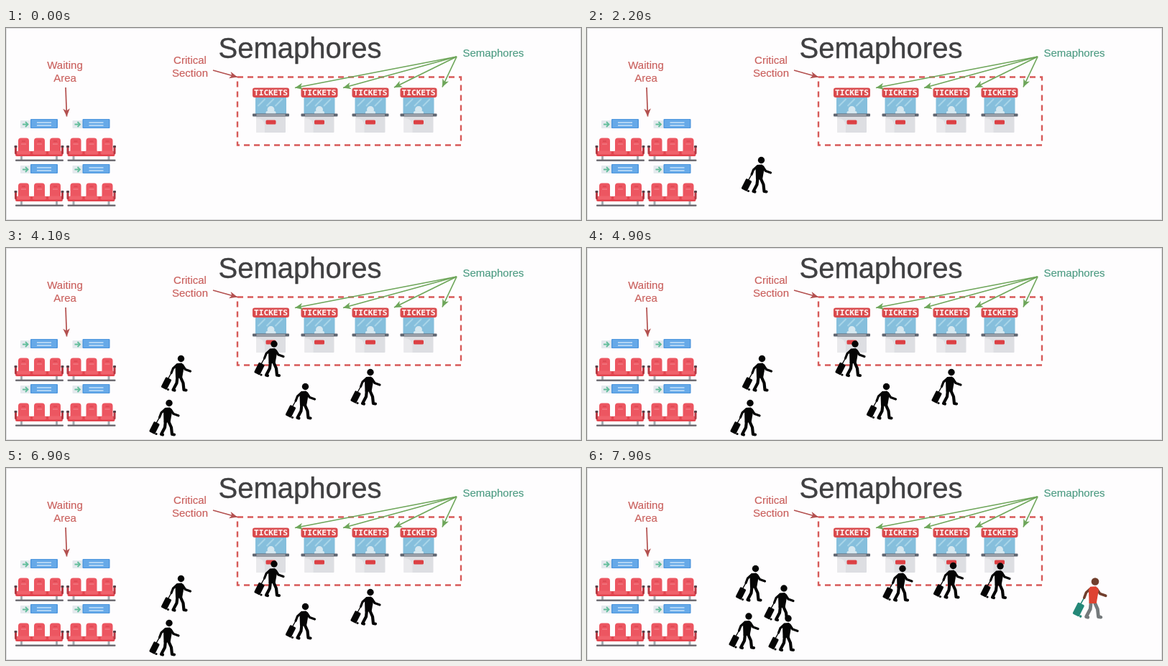
These frames come from a looping animation (800x268 px, 8000 ms). An HTML page with a canvas:

```html
<!DOCTYPE html>
<html lang="en">
<head>
<meta charset="utf-8">
<title>Semaphores</title>
<style>
html, body { margin: 0; width: 100%; height: 100%; overflow: hidden; background: #fefdfe; }
canvas { display: block; width: 800px; height: 268px; }
</style>
</head>
<body>
<canvas id="stage" width="800" height="268"></canvas>
<script>
const ctx = document.getElementById('stage').getContext('2d');
const LOOP = 8000;
const SANS = '"Liberation Sans", Arial, sans-serif';
const MONO = '"DejaVu Sans Mono", monospace';
const LABEL = '#c95f5c', RED = '#b3504f', GREEN = '#6ea65a';

// Each scene holds until the next one starts; people are placed by their heads.
const scenes = [
  { at: 0, people: [] },
  { at: 900, people: [[242.5, 184.5]] },
  { at: 3400, people: [[243.5, 154.5], [227, 216.5], [373, 134], [416.5, 193.5], [507, 173.5]] },
  { at: 7000, people: [[234.5, 140.5], [274, 168], [225, 207], [280, 210],
                       [439, 140.5], [509.5, 136.5], [575, 137]], served: [707, 158.5] }
];

function box(x, y, w, h, color, r = 0) {
  ctx.fillStyle = color;
  ctx.beginPath();
  ctx.roundRect(x, y, w, h, r);
  ctx.fill();
}

function disc(x, y, r, color) {
  ctx.fillStyle = color;
  ctx.beginPath();
  ctx.arc(x, y, r, 0, 2 * Math.PI);
  ctx.fill();
}

function poly(points, color) {
  ctx.fillStyle = color;
  ctx.beginPath();
  points.forEach(([x, y]) => ctx.lineTo(x, y));
  ctx.closePath();
  ctx.fill();
}

function line(points, color, width) {
  ctx.strokeStyle = color;
  ctx.lineWidth = width;
  ctx.beginPath();
  points.forEach(([x, y]) => ctx.lineTo(x, y));
  ctx.stroke();
}

function text(str, x, y, size, color, font = SANS, weight = '') {
  ctx.font = `${weight} ${size}px ${font}`;
  ctx.fillStyle = ctx.strokeStyle = color;
  ctx.textAlign = 'center';
  ctx.lineWidth = size / 100;
  ctx.fillText(str, x, y);
  ctx.strokeText(str, x, y);
}

function at(x, y, scale, draw) {
  ctx.save();
  ctx.translate(x, y);
  ctx.scale(scale, scale);
  draw();
  ctx.restore();
}

function arrow(x1, y1, x2, y2, color) {
  line([[x1, y1], [x2, y2]], color, 1.7);
  ctx.save();
  ctx.translate(x2, y2);
  ctx.rotate(Math.atan2(y2 - y1, x2 - x1));
  poly([[0, 0], [-11, -4.8], [-8, 0], [-11, 4.8]], color);
  ctx.restore();
}

function booth(x) {
  at(x, 83, 1, () => {
    box(-21.5, 12, 43, 26, '#86bfdc');
    for (const dx of [-13, -1, 11]) {
      line([[dx - 5, 26], [dx + 5, 16]], '#a9d5e8', 2);
    }
    disc(0, 31, 5, '#d6e8f0');
    box(-7, 33, 14, 5, '#d6e8f0', 2);
    box(-20.5, 40, 41, 23, '#dddee2', 1);
    box(-20.5, 43, 12, 20, '#e9e9ec', [0, 10, 0, 0]);
    box(-7, 45.5, 14, 6, '#dc4044', 1.5);
    box(-25.5, 36.5, 51, 4, '#5f6570', 1);
    box(-20, 37.5, 40, 2, '#aeb3bb');
    box(-25.5, 0.5, 51, 13.5, '#d94b4e', 3);
    text('TICKETS', 0, 11.3, 11.2, '#fff5f3', MONO, 'bold');
  });
}

function sign(x, y) {
  at(x, y, 1, () => {
    box(0, 2, 15, 11, '#e4eaee', 1);
    line([[3, 7.5], [10, 7.5]], '#62bd9b', 2);
    line([[7, 4], [10.5, 7.5], [7, 11]], '#62bd9b', 1.8);
    box(14, 0, 38, 13, '#4f97de', 1);
    box(15.5, 1, 35, 11, '#66a9e8', 1);
    line([[23, 5], [43, 5]], '#d9ecfb', 1.3);
    line([[23, 9], [43, 9]], '#d9ecfb', 1.3);
  });
}

function seats(x, y) {
  at(x, y, 1, () => {
    box(1, 19, 66, 7, '#e2454f', 2);
    for (const dx of [5, 27, 49]) {
      box(dx, 0.5, 15, 19, '#ec5661', [4, 4, 1, 1]);
      line([[dx + 5, 5], [dx + 10, 5]], '#d33f49', 1);
      line([[dx + 4, 9], [dx + 11, 9]], '#f48890', 1);
      box(dx - 2, 18.5, 19, 5, '#f0626c', 2);
    }
    for (const dx of [0, 65]) {
      box(dx, 12, 3, 11, '#b63943', 1);
      box(dx - 0.5, 11, 4, 3, '#5c4049', 1);
    }
    for (const dx of [8, 57]) box(dx, 26, 3, 5, '#a4a8ae');
    box(1, 30.5, 67, 2.5, '#6f6d73', 1);
  });
}

function person([x, y], look = {}, scale = 1) {
  const { skin = '#050505', shirt = skin, legs = skin, bag = skin } = look;
  at(x, y, scale, () => {
    ctx.lineCap = ctx.lineJoin = 'round';
    line([[-13.5, 20], [-18, 28]], bag, 1.4);
    ctx.save();
    ctx.translate(-20.5, 34.5);
    ctx.rotate(0.46);
    box(-4.5, -8, 9, 16, bag, 1.5);
    ctx.restore();
    disc(-18, 43, 1.6, bag);

    line([[-6, 9], [-11, 13.5], [-13.5, 20]], skin, 3.2);
    line([[-5, 25], [-6, 34], [-11, 43.5], [-9, 44]], legs, 4.2);
    line([[-1, 25], [3, 34], [4, 43.5], [7, 44]], legs, 4.2);
    line([[2, 9], [6, 15], [13, 17.5]], skin, 3.2);
    poly([[-6, 6.5], [1, 6], [4.5, 10], [1.5, 27], [-7.5, 27], [-8, 10]], shirt);
    disc(0, 0, 4.7, skin);
  });
}

function backdrop() {
  box(0, 0, 800, 268, '#fefdfe');
  ctx.strokeStyle = '#dedde0';
  ctx.lineWidth = 1;
  ctx.strokeRect(0.5, 0.5, 799, 267);

  text('Semaphores', 409, 41.8, 40, '#404042');
  text('Waiting', 82, 57, 15, LABEL);
  text('Area', 82, 75, 15, LABEL);
  text('Critical', 256, 50, 15, LABEL);
  text('Section', 256, 68, 15, LABEL);
  text('Semaphores', 678, 40, 15, '#4c9b82');

  ctx.setLineDash([8, 6]);
  ctx.strokeStyle = '#d75a58';
  ctx.lineWidth = 2.4;
  ctx.strokeRect(322, 68.5, 311, 95);
  ctx.setLineDash([]);

  for (const x of [368.5, 436, 507, 574]) booth(x);
  for (const y of [127, 190]) {
    for (const x of [0, 72.5]) {
      sign(20 + x, y);
      seats(12 + x, y + 26);
    }
  }

  arrow(83, 83, 84.5, 123.5, RED);
  arrow(288, 59, 322, 68.5, RED);
  for (const [x, y] of [[402, 83.5], [469, 83.5], [540, 83], [607, 82.5]]) {
    arrow(627, 40, x, y, GREEN);
  }
}

function render(t) {
  const scene = scenes.findLast(s => s.at <= t);
  backdrop();
  scene.people.forEach(p => person(p));
  if (scene.served) {
    person(scene.served, { skin: '#713f2d', shirt: '#de4331', legs: '#74797b', bag: '#248878' }, 1.13);
  }
}

const start = performance.now();
function tick() {
  render((performance.now() - start) % LOOP);
  requestAnimationFrame(tick);
}
tick();
</script>
</body>
</html>
```
